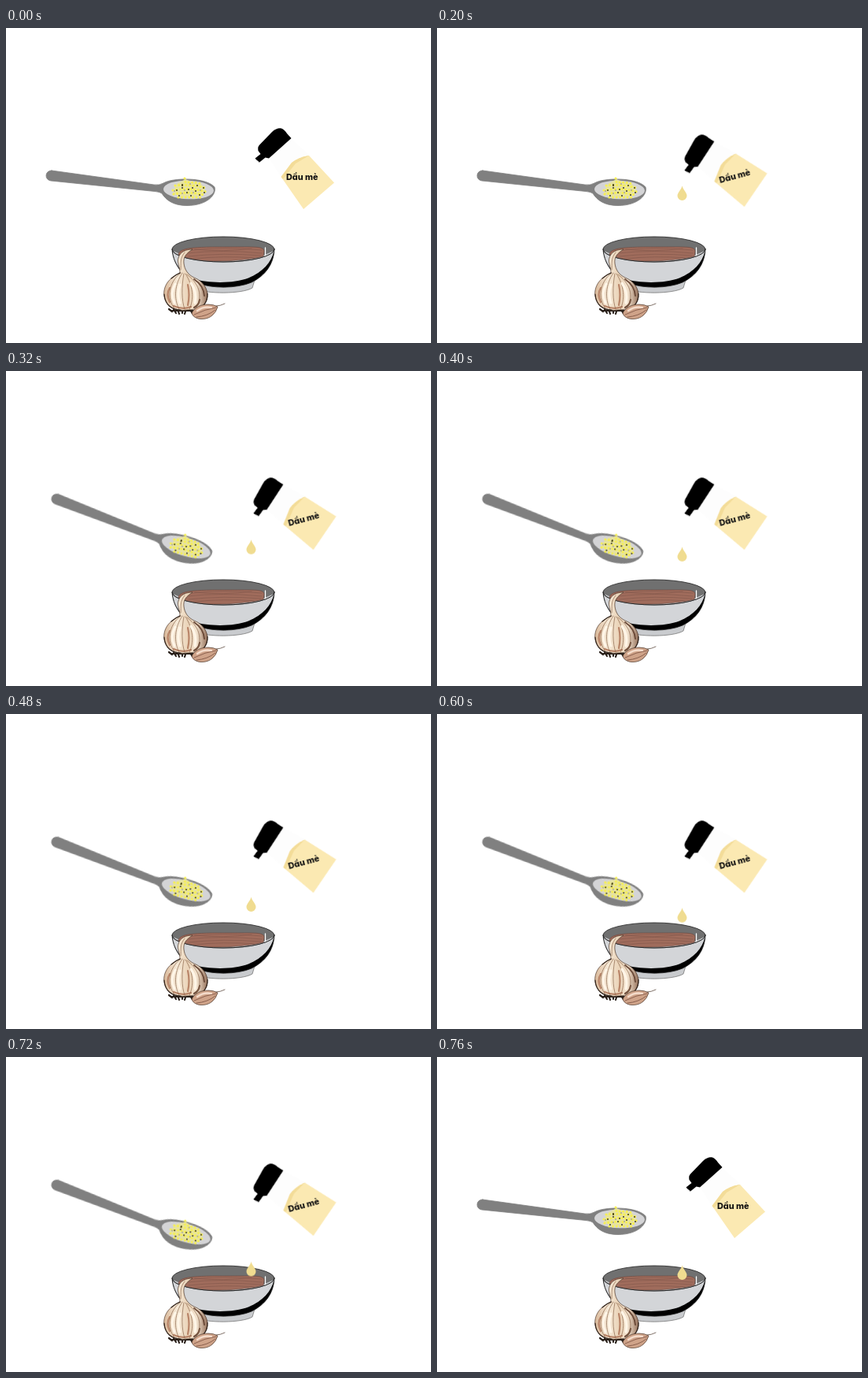
An HTML page without scripts for the animation above (800 ms loop, 540 px wide and 400 px high).

```html
<!DOCTYPE html>
<html lang="vi">
<head>
<meta charset="utf-8">
<title>Dầu mè</title>
<style>
html, body { margin: 0; width: 100%; height: 100%; overflow: hidden; background: #fff; }
svg { display: block; width: 540px; height: 400px; }
.label { font: 800 10.8px Inter, "Open Sans", sans-serif; font-feature-settings: "cv11"; fill: #111; }
.spoon, .bottle, .drop { transform-origin: 0 0; animation: 800ms step-end infinite; }
.spoon { animation-name: tip; }
.bottle { animation-name: pour; }
.drop { animation-name: fall; }
@keyframes tip {
  0%, 95%, 100% { transform: none; }
  30% { transform: translate(64px, 162px) rotate(14.4deg) translate(-57px, -187px); }
}
@keyframes pour {
  0%, 95%, 100% { transform: none; }
  25% { transform: translate(378px, 188px) rotate(-15deg) translate(-376px, -189px); }
}
@keyframes fall {
  0% { opacity: 0; transform: none; }
  25% { opacity: 1; transform: none; animation-timing-function: steps(14); }
  95%, 100% { opacity: 1; transform: translateY(64px); }
}
</style>
</head>
<body>
<svg viewBox="0 0 540 400" fill="none" stroke-linecap="round" stroke-linejoin="round">
  <defs>
    <linearGradient id="skin">
      <stop offset="0" stop-color="#d9b899"/>
      <stop offset=".3" stop-color="#f6ead8"/>
      <stop offset=".55" stop-color="#ead3b8"/>
      <stop offset=".75" stop-color="#f3e4d0"/>
      <stop offset="1" stop-color="#94705a"/>
    </linearGradient>
    <clipPath id="rim"><ellipse cx="276" cy="281" rx="64.500" ry="15.500"/></clipPath>
  </defs>

  <g class="spoon">
    <path fill="#808080" stroke="#808080" stroke-width=".8" d="M58 181 L188 199 Q195 200 200 197 C211 190 254 189 265 202 C268 211 256 225.500 230 225.500 C212 225.500 203 218 198 210 Q195 208 189 207.500 L57 194 A6.500 6.500 0 0 1 58 181Z"/>
    <ellipse cx="232" cy="205.500" rx="32" ry="11.800" fill="#d4d4d6" transform="rotate(2 232 205)"/>
    <path fill="#e6e2a2" d="M212 210 L214 203 L218 197 L228 192 L238 196 L248 198 L253 204 L250 213 L236 215 L220 214Z"/>
    <g stroke="#f6ef52" stroke-width="3.200" stroke-dasharray="0 4.600">
      <path d="M227 191 L228 196 L239 196 L249 198"/>
      <path d="M215 200 Q234 198 253 203"/>
      <path d="M212 206 Q234 202 254 208"/>
      <path d="M213 211 Q234 207 251 212"/>
      <path d="M219 215 H250"/>
    </g>
    <path stroke="#34321c" stroke-width="1.900" d="M217 206h0M224 199v1M224 203h0M232 205h0M237 203h0M241 207h0M246 212h0M220 213h0M251 203h0M230 209h0M243 200h0M252 209h0M235 213h0"/>
    <path stroke="#77759a" stroke-width="1.600" d="M214 207h0M227 206h0M234 198h0M247 206h0M238 209h0M224 210h0"/>
  </g>

  <g class="bottle">
    <path fill="#fdfdfd" d="M362 140 L386 162 L350 190 L334 165Z"/>
    <path fill="#fbe9b2" d="M385 162 L417 196.500 L378 230 L349.500 189 L363 171Q372 164 385 162Z"/>
    <path fill="#f3dc98" d="M385 162 Q372 164 363 171 L349.500 189 L352 192 L368 172Z"/>
    <path fill="#000" d="M322 148.500 L338 132 Q344 126.500 350 127.500 Q354 129 357 134 L362.500 140 L334 165.500 L329.500 164.500 L321.500 171 L316.500 165.500 L323.500 160 L320.500 156 Q319.500 151 322 148.500Z"/>
    <path stroke="#eee" stroke-width="1.500" d="M318.500 168.500 L321 170.500"/>
    <text class="label" x="356" y="193">Dầu mè</text>
  </g>

  <g stroke="#222" stroke-width=".8">
    <path fill="#c9cbce" stroke="#777" d="M238 322 L240 331 C254 338 300 338 313 330 L316 320Z"/>
    <path fill="#000" d="M211 281 C212 300 225 316 243 324 C262 331 293 331 312 323 C330 314 340 300 341 281Z"/>
    <path fill="#d3d5d8" stroke="none" d="M211.500 281 C213 299 222 311 239 318.500 C257 324.500 290 324.500 308 317.500 C327 309 337 298 340.500 283Z"/>
    <ellipse cx="276" cy="281" rx="65" ry="16" fill="#707070"/>
    <g clip-path="url(#rim)">
      <path fill="#c6c8cb" stroke="none" d="M212 283 L219 286 Q276 300 329 288 L340 283 V300 H212Z"/>
      <path fill="#a06c5c" stroke="#684439" stroke-width=".6" d="M219 288 C220 280 232 278 276 278 S326 277 328 283 L327 290 C300 297 246 298 222 293Z"/>
      <path stroke="#80564b" stroke-width=".6" d="M226 283 Q276 277 325 282M229 286 Q276 281 325 286M232 290 Q276 285 324 289M238 293 Q276 289 316 292M240 281 Q276 285 312 280"/>
      <path stroke="#fff" stroke-width="1.300" d="M329.500 279 V289"/>
    </g>
    <path d="M211 281 A65 16 0 0 0 341 281"/>
  </g>

  <g stroke="#4a3428" stroke-width=".7">
    <path stroke="#2a211b" stroke-width="2.200" d="M207 357 L211 360M213 357 L216 362M218 357 L220 363M224 357 V362M229 357 L227 363M233 357 L237 362M211 359 H238"/>
    <path fill="url(#skin)" d="M221 311 C221 302 217 298 219 292 C221 284 229 281 237 281 C229 286 225 291 226 299 C227 307 231 313 239 317 C250 321 257 331 256 342 C254 354 242 358 230 358 C216 360 203 354 201 341 C199 328 207 317 221 311Z"/>
    <path stroke="#b98569" stroke-width="2.200" d="M208 330 Q203 338 208 348M231 326 Q234 339 231 352M213 353 Q224 358 235 354"/>
    <path stroke="#6d4c3a" stroke-width="2" d="M239 319 Q251 327 252 340M246 345 Q245 352 239 355"/>
    <path stroke="#8a6549" d="M222 311 C206 323 204 344 214 356M224 311 C214 326 213 344 220 357M226 312 C223 328 223 346 227 357M228 312 C238 327 239 345 233 357M230 313 C249 327 249 345 241 356M222 307 C223 298 220 294 227 285"/>
    <path stroke="#fff6e8" stroke-width="3" d="M215 325 Q208 337 214 349M235 324 Q243 335 240 349M221 326 Q217 338 221 349"/>
    <path stroke="#33261e" stroke-width="1.200" d="M201 338 C202 352 211 358 222 358M256 337 C256 350 250 355 242 357M210 318 Q216 313 221 311"/>
    <path fill="#cfa389" d="M236 362 C240 354 248 351 257 351 Q264 351 269 354 Q267 361 262 365 C256 370 249 370 244 369 Q237 367 236 362Z"/>
    <path stroke="#f4dccb" stroke-width="2.400" d="M243 359 Q251 353 261 355"/>
    <path stroke="#6f4636" d="M239 364 Q253 357 267 355M242 367 Q256 366 266 358"/>
    <path d="M267 353 Q272 353 278 350"/>
  </g>

  <path class="drop" fill="#f0dc90" d="M311.500 200.500 C313 206 317.500 209 317.500 213 A6 6 0 0 1 305.500 213 C305.500 209 310 206 311.500 200.500Z"/>
</svg>
</body>
</html>
```
